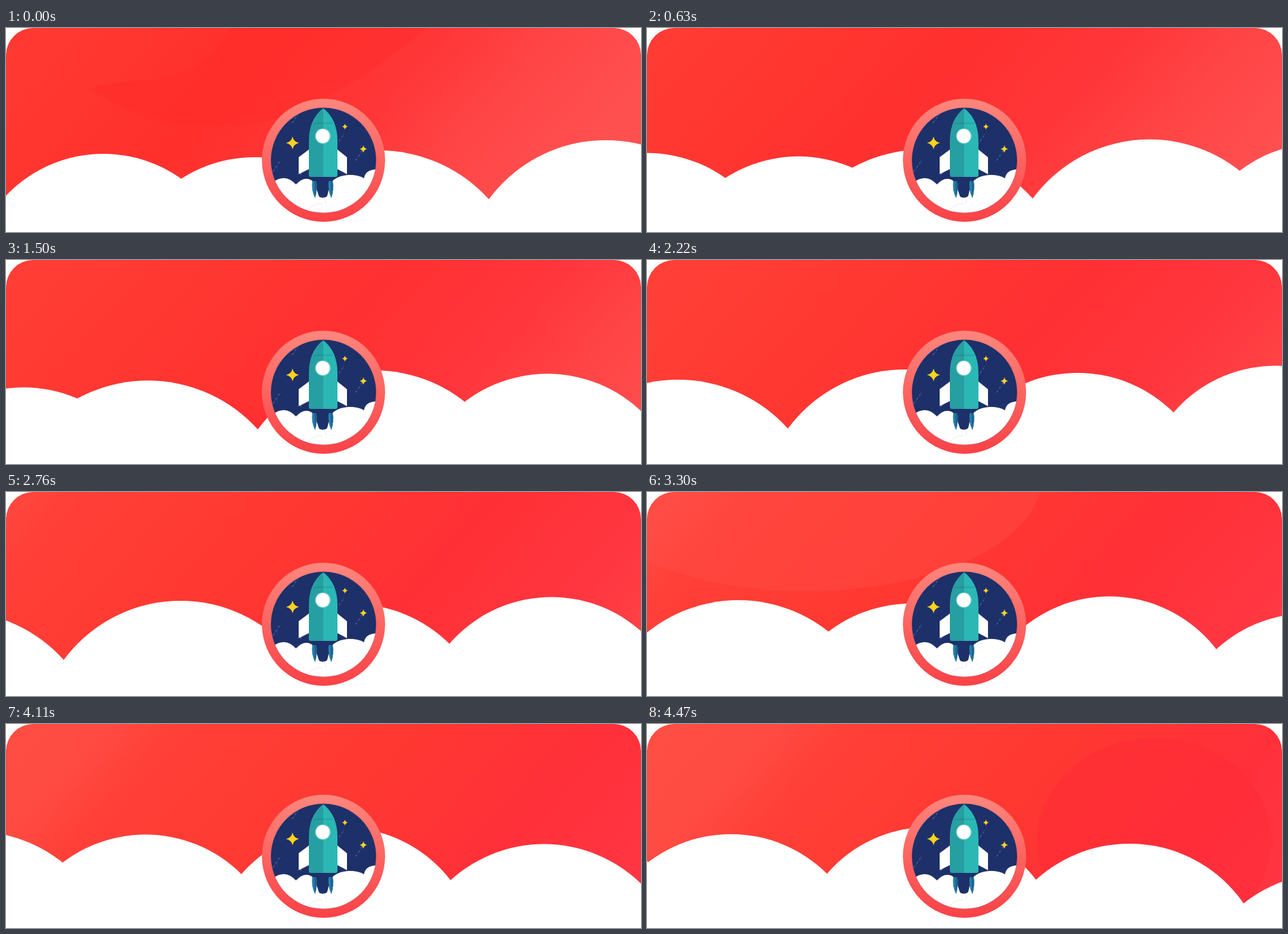
These frames come from a looping animation (933x300 px, 4500 ms). An HTML page with a canvas:

```html
<!DOCTYPE html>
<html lang="en">
<head>
<meta charset="utf-8">
<title>Rocket above the clouds</title>
<style>
  html, body { margin: 0; width: 100%; height: 100%; overflow: hidden; background: #fff; }
  canvas { display: block; }
</style>
</head>
<body>
<canvas id="stage" width="933" height="300"></canvas>
<script>
const W = 933, H = 300, LOOP = 4500, STEP = 30;
const ctx = document.getElementById('stage').getContext('2d');

// Cloud circles: x and y of the top, radius
const clouds = [
  [143, 185, 197], [365, 190, 198], [548, 180, 217], [881, 165, 213],
  [1135, 170, 200], [1426, 159.5, 198], [1720.5, 184, 204], [2013, 228, 200]
];

// Offset from the deepest red, green, blue
const sky = [
  [-900, 78, 67], [-740, 75, 66], [-640, 64, 56], [-300, 56, 49],
  [0, 48, 44], [250, 54, 55], [420, 69, 70], [620, 80, 80], [900, 82, 82]
];

function fill(color, path) {
  ctx.fillStyle = color;
  ctx.fill(typeof path === 'string' ? new Path2D(path) : path);
}

function disc(color, x, y, rx, ry = rx) {
  const path = new Path2D();
  path.ellipse(x, y, rx, ry, 0, 0, 2 * Math.PI);
  fill(color, path);
}

function star(x, y, r) {
  const k = r * 0.16;
  const arm = (cx, cy, ex, ey) => `Q${x + cx} ${y + cy} ${x + ex} ${y + ey}`;
  fill('#ffd21e', `M${x} ${y - r}` + arm(k, -k, r, 0) + arm(k, k, 0, r) +
    arm(-k, k, -r, 0) + arm(-k, -k, 0, -r) + 'Z');
}

// Runs a drawing that fades in and out around a moment
function around(t, moment, spread, draw) {
  ctx.globalAlpha = Math.max(0, 1 - Math.abs(t - moment) / spread);
  draw();
  ctx.globalAlpha = 1;
}

function drawSky(t) {
  const slope = 0.9, span = 1800;
  const center = 400 + 0.12 * t;
  const n = 1 + slope * slope;
  const start = center - span / 2;
  const g = ctx.createLinearGradient(start, 0, start + span / n, span * slope / n);
  for (const [u, green, blue] of sky) {
    const cool = u >= 0 && u < 300 ? 14 * t / LOOP : 0;
    g.addColorStop(0.5 + u / span, `rgb(255,${green},${blue + cool})`);
  }
  ctx.fillStyle = g;
  ctx.fillRect(0, 0, W, H);

  around(t, 0, 400, () => fill('rgba(255,44,40,.4)',
    'M120 90C190 132 265 150 340 144C450 132 540 62 620 0H330Q290 74 210 77Q150 78 120 90Z'));
  around(t, 3300, 500, () => disc('rgba(255,78,72,.4)', 235, -20, 345, 166));
  around(t, 4470, 350, () => disc('rgba(255,40,54,.4)', 745, 172, 172, 152));
}

function drawClouds(t) {
  for (const [x, y, r] of clouds) {
    disc('#fff', x - 0.2263 * t, y - 0.0018 * t + r, r);
  }
}

function drawBadge() {
  const x = 466.5, y = 194.5;
  const ring = ctx.createLinearGradient(0, 104, 0, 285);
  ring.addColorStop(0, '#ff877d');
  ring.addColorStop(1, '#fa4146');
  disc(ring, x, y, 90.5);

  ctx.save();
  ctx.beginPath();
  ctx.arc(x, y, 77.3, 0, 2 * Math.PI);
  ctx.clip();
  ctx.fillStyle = '#1d3069';
  ctx.fillRect(380, 110, 180, 170);

  for (let i = 1; i < 75; i++) {
    disc('rgba(190,205,240,.5)', 389 + i * 61.8 % 154, 122 + i * 37.3 % 94, i % 4 ? 0.4 : 0.8);
  }
  star(421, 169, 9.5);
  star(498, 145, 4.5);
  star(525, 178, 5.5);

  fill('#fff', 'M392 300V227Q410 213 426 230Q440 215 453 227L460 248Q467 252 472 247' +
    'L476 229Q485 217 504 216Q518 216 526 221Q528 208 545 208V300H380V230Z');
  ctx.strokeStyle = '#e4e5e9';
  ctx.lineWidth = 0.8;
  ctx.stroke(new Path2D('M444 267Q454 258 465 258M466 249Q471 252 469 258'));

  for (const left of [449, 473]) {
    fill('#2380a5', `M${left + 1} 225H${left + 7}Q${left + 9} 237 ${left + 5} 250Q${left - 1} 238 ${left + 1} 225Z`);
    fill('#1d6190', `M${left + 4} 225H${left + 7}Q${left + 9} 237 ${left + 5} 250Z`);
  }
  fill('#fff', 'M446 178L430 190V215L446 207ZM486 178L501 190V215L486 207Z');
  fill('#269fa2', 'M466 118Q445 134 445 166V216Q445 219 448 219H466Z');
  fill('#2bb7b4', 'M466 118Q487 134 487 166V216Q487 219 484 219H466Z');
  fill('rgba(20,110,120,.45)', 'M451 139.5H481V140.5H451Z');
  disc('#8ed6d4', 465.5, 159, 11.2);
  disc('#fff', 465.5, 159, 10.2);
  ctx.restore();
}

function frame(now) {
  const t = Math.floor(now % LOOP / STEP) * STEP;
  ctx.clearRect(0, 0, W, H);
  ctx.save();
  ctx.beginPath();
  ctx.roundRect(0, 0, W, H, [40, 40, 0, 0]);
  ctx.clip();
  drawSky(t);
  drawClouds(t);
  ctx.restore();
  drawBadge();
  requestAnimationFrame(frame);
}
requestAnimationFrame(frame);
</script>
</body>
</html>
```
